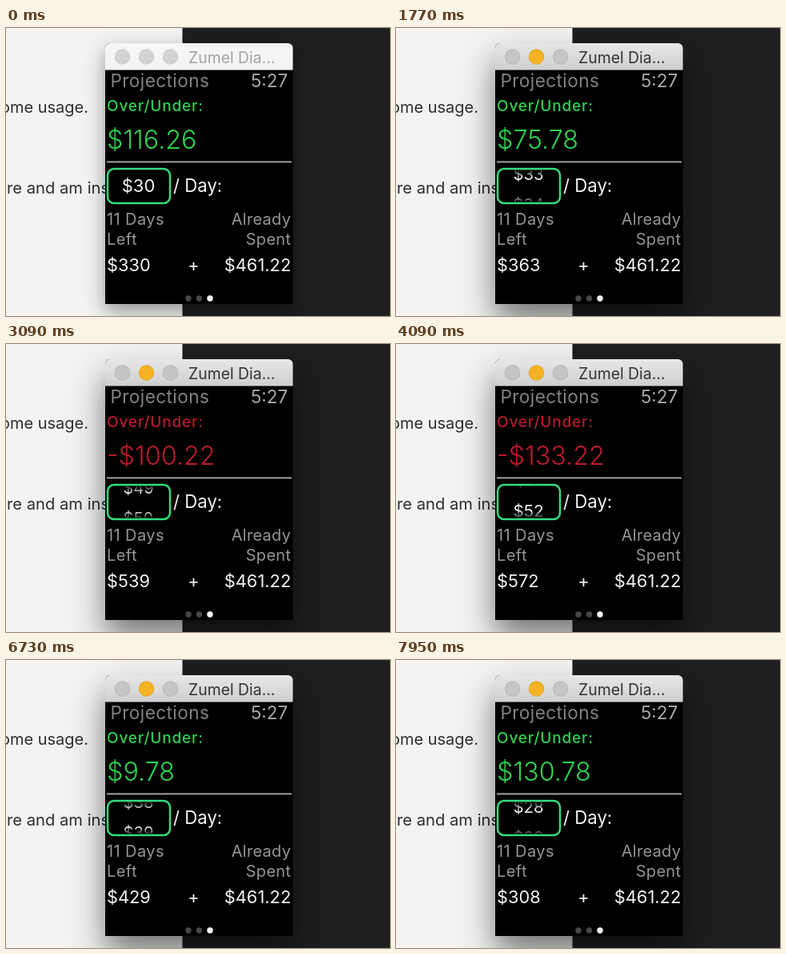
An HTML page with a canvas for the animation above (8000 ms loop, 480 by 360 pixels).

```html
<!DOCTYPE html>
<html lang="en">
<head>
<meta charset="utf-8">
<title>Daily budget projection</title>
<style>
html, body { margin: 0; width: 100%; height: 100%; overflow: hidden; background: #1d1e20; }
canvas { display: block; width: 100vw; height: 100vh; }
</style>
</head>
<body>
<canvas id="stage"></canvas>
<script>
const LOOP = 8000, W = 480, H = 360;
const BUDGET = 900, SPENT = 461.22, DAYS = 11;
const ACTIVATE = 1000, FIRST_UPDATE = 500;
const GREEN = '#2fd350', RED = '#b81b2c', GREY = '#959597', WHITE = '#f2f2f2';

const win = { x: 124, y: 19, w: 234.6, h: 326, bar: 33.4 };
const box = { x: 127, y: 176, w: 78, h: 43, r: 8, row: 38 };

const canvas = document.getElementById('stage');
const ctx = canvas.getContext('2d');
const dpr = window.devicePixelRatio || 1;
canvas.width = W * dpr;
canvas.height = H * dpr;

function ease(t, start, span, power = 1) {
  const u = Math.min(1, Math.max(0, (t - start) / span)) ** power;
  return u * u * (3 - 2 * u);
}

// Dollars per day: spin up, settle back a little, spin down
function pickerAt(t) {
  return 30 + 22.3 * ease(t, 1158, 2490)
    - 0.6 * ease(t, 3600, 500)
    - 24.2 * ease(t, 5608, 2780, 0.7);
}

function text(str, x, y, size, color, { align = 'left', weight = 400, spacing = 0 } = {}) {
  ctx.font = `${weight} ${size}px Inter, Roboto, sans-serif`;
  ctx.letterSpacing = spacing + 'px';
  ctx.textAlign = align;
  ctx.textBaseline = 'alphabetic';
  ctx.fillStyle = color;
  ctx.fillText(str, x, y);
}

function dot(x, y, r, color) {
  ctx.fillStyle = color;
  ctx.beginPath();
  ctx.arc(x, y, r, 0, Math.PI * 2);
  ctx.fill();
}

function roundBox(x, y, w, h, r) {
  ctx.beginPath();
  ctx.roundRect(x, y, w, h, r);
}

function money(v) {
  return (v < 0 ? '-$' : '$') + Math.abs(v).toFixed(2);
}

function drawDesk() {
  ctx.fillStyle = '#1d1e20';
  ctx.fillRect(0, 0, W, H);
  ctx.fillStyle = '#f4f3f2';
  ctx.fillRect(0, 0, 220.5, H);
  text('some usage.', 103, 105.5, 20, '#2e2e2e', { align: 'right' });
  text('re and am ins', 1, 207, 20.2, '#2e2e2e');
}

function drawWindow(active) {
  const { x, y, w, h, bar } = win, corners = [6, 6, 0, 0];
  ctx.save();
  ctx.shadowColor = active ? 'rgba(0,0,0,.52)' : 'rgba(0,0,0,.4)';
  ctx.shadowBlur = (active ? 42 : 24) * dpr;
  ctx.shadowOffsetY = (active ? 21 : 9) * dpr;
  ctx.fillStyle = '#000';
  roundBox(x, y, w, h, corners);
  ctx.fill();
  ctx.restore();

  const shade = ctx.createLinearGradient(0, y, 0, y + bar);
  shade.addColorStop(0, active ? '#e8e7e8' : '#f6f6f6');
  shade.addColorStop(1, active ? '#d0cfd0' : '#f4f4f4');
  ctx.fillStyle = shade;
  roundBox(x, y, w, bar, corners);
  ctx.fill();

  for (let i = 0; i < 3; i++) {
    const lit = active && i === 1, cx = 145.5 + i * 30;
    dot(cx, 36, 9.7, lit ? '#dda423' : active ? '#b3b2b3' : '#cbcbcb');
    dot(cx, 36, 8.9, lit ? '#f4b323' : active ? '#c6c5c6' : '#d3d3d3');
  }
  text('Zumel Dia\u2026', 228, 43.5, 19.4, active ? '#333' : '#a2a2a2');
}

function drawPicker(pos) {
  const { x, y, w, h, r, row } = box;
  ctx.save();
  roundBox(x, y, w, h, r);
  ctx.clip();
  ctx.fillStyle = '#000';
  ctx.fillRect(x, y, w, h);
  for (let n = Math.floor(pos); n <= Math.floor(pos) + 1; n++) {
    const d = n - pos;
    const shrink = 1 - 0.08 * Math.min(1, Math.abs(d) * 2.5);
    ctx.save();
    ctx.translate(x + w / 2 - 0.5, y + h / 2 - 0.5 + d * row);
    ctx.scale(shrink, shrink);
    text('$' + n, 0, 8, 22, WHITE, { align: 'center' });
    ctx.restore();
  }
  const fade = ctx.createLinearGradient(0, y, 0, y + h);
  fade.addColorStop(0, '#000');
  fade.addColorStop(0.24, 'rgba(0,0,0,0)');
  fade.addColorStop(0.76, 'rgba(0,0,0,0)');
  fade.addColorStop(1, '#000');
  ctx.fillStyle = fade;
  ctx.fillRect(x, y, w, h);
  ctx.restore();

  ctx.strokeStyle = '#35dc7c';
  ctx.lineWidth = 2.5;
  roundBox(x, y, w, h, r);
  ctx.stroke();
}

function drawFace(t) {
  const pos = pickerAt(t), rate = Math.round(pos);
  const over = t < FIRST_UPDATE ? 116.26 : BUDGET - SPENT - DAYS * rate;
  const tone = over < 0 ? RED : GREEN;
  const left = 126, right = 356.3;
  const label = { spacing: 0.4 }, labelEnd = { align: 'right', spacing: 0.3 };

  text('Projections', 130.5, 74, 22.6, '#828285', { spacing: 0.4 });
  text('5:27', 352.3, 74, 22.5, '#a9a9ac', { align: 'right' });
  text('Over/Under:', left, 104, 19, tone, { weight: 500, spacing: 0.85 });
  text(money(over), left, 151, 32.3, tone, { weight: 350 });

  ctx.fillStyle = '#a0a0a2';
  ctx.fillRect(left, 166.4, 231, 2);

  drawPicker(pos);
  text('/ Day:', 209, 205, 22.2, WHITE);

  text('11 Days', left, 246, 20, GREY, label);
  text('Left', left, 271, 20, GREY, label);
  text('Already', right, 246, 20, GREY, labelEnd);
  text('Spent', right, 271, 20, GREY, labelEnd);

  text('$' + DAYS * rate, left, 304, 21.8, WHITE);
  text('+', 234.5, 304, 21.8, WHITE, { align: 'center' });
  text(money(SPENT), right, 304, 21.9, WHITE, { align: 'right' });

  for (let i = 0; i < 3; i++) dot(228 + i * 13.5, 338, 3.7, i === 2 ? '#fff' : '#48484a');
}

function draw(t) {
  ctx.setTransform(dpr, 0, 0, dpr, 0, 0);
  drawDesk();
  drawWindow(t >= ACTIVATE);
  drawFace(t);
}

const start = performance.now();
function tick() {
  draw((performance.now() - start) % LOOP);
  requestAnimationFrame(tick);
}
tick();
</script>
</body>
</html>
```
